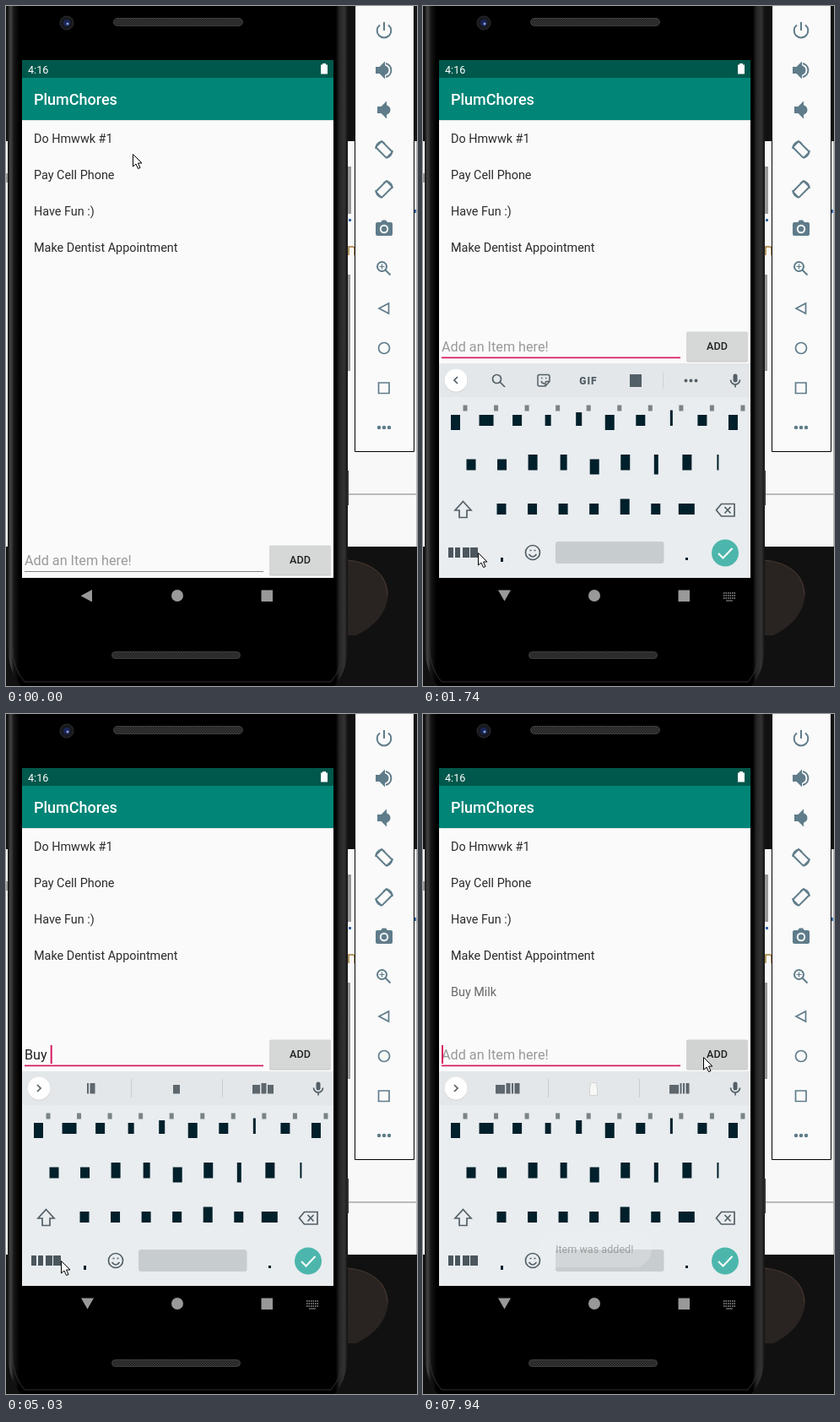
Write an HTML page that moves like this. It is 487 px wide and 805 px high and loops after 8 s.

```html
<!DOCTYPE html>
<html lang="en">
<head>
<meta charset="utf-8">
<title>Todo list demo</title>
<style>
  html, body { margin: 0; width: 100%; height: 100%; overflow: hidden; background: #111; }
  svg { display: block; width: 487px; height: 805px; font-family: Roboto, sans-serif; }
  text { white-space: pre; }
  .line { fill: none; stroke: #5f7c8a; stroke-width: 2; }
  .key { fill: none; stroke: #535f66; stroke-width: 1.7; }
  .item { font-size: 14.4px; fill: #2b2b2b; }
</style>
</head>
<body>
<svg viewBox="0 0 487 805">
  <defs>
    <linearGradient id="edge">
      <stop offset="0" stop-color="#111"/><stop offset=".008" stop-color="#444"/>
      <stop offset=".018" stop-color="#161616"/><stop offset=".035" stop-color="#000"/>
      <stop offset=".965" stop-color="#000"/><stop offset=".975" stop-color="#242424"/>
      <stop offset=".99" stop-color="#333"/><stop offset="1" stop-color="#111"/>
    </linearGradient>
    <pattern id="mesh" width="3" height="3" patternUnits="userSpaceOnUse">
      <path fill="#1c1c1c" d="M0 0h3v3h-3z"/><path fill="#3b3b3b" d="M0 0h1.5v1.5h-1.5zM1.5 1.5h1.5v1.5h-1.5z"/>
    </pattern>
    <g id="rotate" class="line">
      <rect x="-9" y="-5" width="18" height="10" rx="1.5" transform="rotate(45)"/>
      <path d="M-10 -1A10 10 0 0 1 -3 -10l4 3M10 1A10 10 0 0 1 3 10" stroke-width="1.6"/>
    </g>
    <g id="speaker" fill="#5f7c8a"><path d="M-9 -3h4l5 -5v16l-5 -5h-4zM2 -4a4.5 4.5 0 0 1 0 8z"/></g>
  </defs>

  <!-- desktop behind the phone -->
  <path fill="#111" d="M0 0h487v805h-487z"/>
  <path fill="#f8f8f8" d="M0 160h487v480h-487z"/>
  <path fill="#292321" d="M400 655Q452 660 453 697Q450 728 415 745H400z"/>
  <path fill="none" stroke="#47382f" d="M405 656Q450 661 452 697"/>
  <path fill="#999" d="M404 190h5v56h-5zM404 318h4v114h-4zM0 198h3v11h-3z"/>
  <path fill="#bbb" d="M400 577h87v2h-87zM486 160h1v480h-1z"/>
  <path fill="#3567a5" d="M406 252h3v3h-3zM484 241h2v4h-2z"/>
  <path fill="none" stroke="#a07935" stroke-width="1.5" d="M406 295v-10h5q2 0 2 3v7"/>

  <!-- phone -->
  <path fill="url(#edge)" d="M2 0H405V755Q405 788 389 805H18Q2 788 2 755z"/>
  <path fill="none" stroke="#303030" d="M7.5 0V757Q8 785 22 800H385Q399 785 399.500 757V0"/>
  <path fill="#333" d="M404 550h2v41h-2z"/>
  <circle cx="72" cy="20" r="8" fill="#17191d" stroke="#2b2d31"/>
  <circle cx="72" cy="20" r="4" fill="#1b2557"/><circle cx="73" cy="21" r="1.5" fill="#8ba3d8"/>
  <g fill="url(#mesh)" stroke="#3d3d3d">
    <rect x="127.500" y="14.500" width="153" height="9" rx="4.500"/>
    <rect x="125.500" y="764.500" width="152" height="8" rx="4"/>
  </g>

  <!-- app -->
  <path fill="#fafafa" d="M19 64h369v613h-369z"/>
  <path fill="#00574b" d="M19 64h369v21h-369z"/>
  <path fill="#008577" d="M19 85h369v50h-369z"/>
  <path fill="#dfe4e3" d="M19 135h369v1h-369z"/>
  <text x="26" y="79.500" font-size="12.600" fill="#fff">4:16</text>
  <path fill="#fff" d="M375 68h4v1.500h2v11h-8v-11h2z"/>
  <text x="33" y="117" font-size="18" font-weight="500" fill="#fff">PlumChores</text>
  <g id="list"></g>

  <g id="entry">
    <text id="hint" x="22" y="662" font-size="16.200" fill="#999">Add an Item here!</text>
    <text id="typed" x="22" y="662" font-size="16.200" fill="#222"><tspan id="done"></tspan><tspan id="word" text-decoration="underline"></tspan></text>
    <rect id="rule" x="22" width="283"/>
    <rect id="caret" y="645" width="2" height="22" fill="#d81b60"/>
    <rect x="312" y="639.500" width="73" height="35" rx="2" fill="#ccc"/>
    <rect id="button" x="312" y="638.500" width="73" height="34.500" rx="2"/>
    <text x="348.500" y="660" font-size="12.600" font-weight="500" text-anchor="middle" fill="#222">ADD</text>
  </g>

  <svg x="19" y="380" width="369" height="297" viewBox="19 380 369 297">
    <g id="keyboard">
      <path fill="#e9edf0" d="M19 423h369v254h-369z"/>
      <path fill="#e3e7ea" d="M19 423h369v40h-369z"/>
      <circle cx="39" cy="443.500" r="14" fill="#d2d6d9"/><circle cx="39" cy="443" r="13.500" fill="#fff"/>
      <path id="chevron" class="key"/>
      <g id="tools" class="key">
        <circle cx="87.500" cy="441.500" r="5"/><path d="M91 445l6 6"/>
        <path d="M138 436.500h10q2 0 2 2v6l-5 5.500h-7q-2 0 -2 -2v-9.500q0 -2 2 -2zM150 444.500h-3.500q-1.500 0 -1.500 1.500v4M140 444q1 3 4 3M140 440.500h1.500M145 440.500h1.500" stroke-width="1.5"/>
        <text x="196" y="447.500" font-size="12" font-weight="900" letter-spacing="1" text-anchor="middle" fill="#535f66" stroke="none">GIF</text>
        <path d="M245 436h14v15h-14z" fill="#535f66" stroke="none"/>
        <path d="M284.500 433v20" stroke="#cdd2d5" stroke-width="1"/>
        <path d="M311.500 443.500h0M317.500 443.500h0M323.500 443.500h0" stroke-width="4" stroke-linecap="round"/>
      </g>
      <g id="guesses">
        <path stroke="#c8cdd0" d="M148.500 432v22M256.500 432v22"/>
        <g id="guessBlocks" fill="#5d676d"></g>
        <path id="glass" fill="#f7f7f5" stroke="#d3d5d4" d="M198.500 436.500h7v4l1 2v9h-9v-9l1 -2z"/>
      </g>
      <rect x="367.500" y="435.500" width="5" height="10" rx="2.500" fill="#535f66"/>
      <path class="key" d="M364.500 442.500a5.500 5.500 0 0 0 11 0M370 448v3.500" stroke-width="1.5"/>
      <g id="keys"></g>
      <path class="key" d="M47.500 586.500l9.500 10.500h-5v8.500h-9v-8.500h-5z"/>
      <path class="key" d="M353.500 589.500h15.500v14.500h-15.500l-6 -7.250zM357.500 593l7 7.500M364.500 593l-7 7.500"/>
      <path fill="#4b565d" d="M30 641h6v12h-6zM38 641h6v12h-6zM47 641h8v12h-8zM56 641h9v12h-9z"/>
      <path fill="#00202b" d="M92 653h3v5h-3zM311 653h3v3h-3z"/>
      <g class="key"><circle cx="130" cy="647" r="8.500"/><path d="M125.500 649q4.500 6 9 0M126.500 644.500h2M131.500 644.500h2"/></g>
      <rect x="157" y="634" width="128.500" height="26" rx="3" fill="#c7cccf"/>
      <circle cx="358" cy="647.500" r="16" fill="#4db6ac"/>
      <path d="M350 648l5.500 5.500 11 -11.500" fill="none" stroke="#fff" stroke-width="2"/>
    </g>
  </svg>
  <g id="toast">
    <rect x="137" y="612" width="134" height="43" rx="21" fill="#f2f2f2" opacity=".45"/>
    <text x="157" y="638" font-size="12.600" fill="#777">Item was added!</text>
  </g>

  <!-- navigation bar -->
  <g fill="#999">
    <path id="back"/>
    <circle cx="203" cy="698" r="7"/><path d="M302.500 691.500h13.500v13.500h-13.500z"/>
    <g id="keyboardIcon" fill="none" stroke="#999" stroke-dasharray="1.500 1">
      <path d="M356 695h14M356 698h14M356 701h14" stroke-width="1.5"/><path d="M359 704h8" stroke-dasharray="none"/>
    </g>
  </g>

  <!-- emulator panel -->
  <path fill="#fafafa" stroke="#000" d="M413.500 -1H483.500V527.500H413.500z"/>
  <g class="line">
    <path d="M448 19v10M443 22.500a8.300 8.300 0 1 0 10 0"/>
    <g transform="translate(448 76)"><use href="#speaker"/><path d="M2 -8a8.200 8.200 0 0 1 0 16"/></g>
    <use href="#speaker" x="450" y="123"/>
    <use href="#rotate" x="448" y="170"/>
    <use href="#rotate" transform="translate(448 217) scale(-1 1)"/>
    <path d="M440 256h4l2 -2.500h4l2 2.500h4q2 0 2 2v12q0 2 -2 2h-16q-2 0 -2 -2v-12q0 -2 2 -2z" fill="#5f7c8a" stroke="none"/>
    <circle cx="448" cy="264" r="4.200" stroke="#fafafa"/>
    <circle cx="445.500" cy="308.500" r="5.500"/><path d="M449.500 312.500l6 6"/><path d="M442.500 308.500h6M445.500 305.500v6" stroke-width="1.2"/>
    <path d="M442 358l11.500 -6v12z" stroke-width="1.7"/>
    <circle cx="448" cy="405" r="6.500" stroke-width="1.7"/>
    <path d="M441.500 446h12.500v12.500h-12.500z" stroke-width="1.7"/>
    <path d="M442 499h0M448 499h0M454 499h0" stroke-width="4.500" stroke-linecap="round"/>
  </g>

  <path id="pointer" fill="#fff" stroke="#000" d="M.5 .5v14.500l3.500 -3 2.500 5.500 2.500 -1 -2.500 -5.500h4.500z"/>
</svg>
<script>
const $ = id => document.getElementById(id);
const set = (id, attrs) => { for (const k in attrs) $(id).setAttribute(k, attrs[k]); };
const show = (id, on) => set(id, { opacity: +on });
const block = (x, y, w, h, fill) => `<rect x="${x}" y="${y}" width="${w}" height="${h}" fill="${fill}"/>`;

$('list').innerHTML = ['Do Hmwwk #1', 'Pay Cell Phone', 'Have Fun :)', 'Make Dentist Appointment', 'Buy Milk']
  .map((s, i) => `<text class="item" x="33" y="${162 + 43 * i}" ${i == 4 ? 'id="added"' : ''}>${s}</text>`).join('');

// Keys are blocks sized like their letters: ascenders rise, descenders drop.
const widths = { w: 17, m: 19, i: 3, l: 2, j: 5, f: 8, r: 7, t: 7 };
const keyRow = (letters, x, base) => [...letters].map((c, i) => {
  const w = widths[c] || 11;
  const top = 'bdfhijkl'.includes(c) ? 18.5 : c == 't' ? 16 : 13;
  const drop = 'gjpqy'.includes(c) ? 5 : 0;
  return block(x + 36.55 * i - w / 2, base - top, w, top + drop, '#00202b');
}).join('');
$('keys').innerHTML = keyRow('qwertyuiop', 38.5, 497) + keyRow('asdfghjkl', 57, 549.5) + keyRow('zxcvbnm', 93, 602) +
  Array.from({ length: 10 }, (_, i) => block(47.5 + 36.55 * i, 472.5, 5, 7, '#7b8387')).join('');

// Each suggestion is [start x, block widths...].
const guesses = {
  B: [[97, 7], [197, 10], [293, 8, 9]],
  Bu: [[92, 8, 6], [196, 6, 5], [292, 8, 6, 8]],
  Buy: [[90, 8, 6, 6], [194, 6, 8], [292, 9, 7, 9]],
  'Buy ': [[96, 2, 6], [198, 8], [292, 9, 6, 7]],
  M: [[96, 9], [196, 6, 6], [296, 8, 8]],
  Mi: [[92, 11, 2, 5], [196, 9, 2], [293, 11, 2, 2, 6]],
  Milk: [[86, 11, 5, 2, 6], [], [292, 11, 2, 2, 4]]
};
const drawGuesses = name => guesses[name].map(([start, ...sizes]) => {
  let x = start;
  return sizes.map((w, i) => {
    const y = w < 7 ? 437 : 439, b = block(x, y, w, 449.5 - y, '#5d676d');
    x += w + 1.5;
    return b;
  }).join('');
}).join('');

// Stepped tracks: [time, value...], held until the next entry.
const pointer = [[0, 150, 175], [150, 130, 318], [270, 113, 463], [570, 107, 505], [690, 99, 569], [810, 85, 640],
  [930, 69, 681], [1050, 65, 653], [1350, 65, 647], [6590, 174, 518], [6720, 280, 416], [6870, 295, 413],
  [7000, 307, 411], [7120, 314, 409], [7270, 330, 407], [7420, 332, 406]];
const typing = [[0, '', ''], [4640, '', 'B'], [4790, '', 'Bu'], [4910, '', 'Buy'], [5030, 'Buy ', ''],
  [5590, 'Buy ', 'M'], [5890, 'Buy ', 'Mi'], [6010, 'Buy ', 'Milk'], [7690, '', '']];
const guessing = [[0, 'B'], [4790, 'Bu'], [4910, 'Buy'], [5030, 'Buy '], [5590, 'M'], [5740, 'Mi'], [6160, 'Milk']];
const blink = [[0, 0], [1350, 1], [1620, 0], [2200, 1], [2760, 0], [3320, 1], [3780, 0], [4210, 1], [6590, 0], [7120, 1]];
const slide = [[0, 60, 0], [1620, 24, .6], [1740, 0, 1]];
const fadeItem = [[0, 0], [7690, .25], [7820, .5], [7940, .7]];
const fadeToast = [[0, 0], [7820, .25], [7940, .6]];
const press = [[0, '#d6d7d7'], [7570, '#cacbcb'], [7820, '#d1d2d2']];
const at = (track, t) => track.findLast(step => step[0] <= t).slice(1);

function draw(now) {
  const t = now % 8000, focused = t >= 1200, open = t >= 1620, wide = t >= 4640;
  const [px, py] = at(pointer, t), [done, word] = at(typing, t), [drop, alpha] = at(slide, t);
  const [guess] = at(guessing, t);
  set('pointer', { transform: `translate(${px} ${py})` });
  set('entry', { transform: `translate(0 ${open ? -253 : 0})` });
  set('rule', { y: focused ? 668.5 : 669, height: focused ? 1.7 : 1, fill: focused ? '#d81b60' : '#868686' });
  set('button', { fill: at(press, t)[0] });
  $('done').textContent = done;
  $('word').textContent = word;
  show('hint', !(done + word));
  set('caret', { x: 22 + (done + word ? $('typed').getComputedTextLength() : 0), opacity: at(blink, t)[0] });
  set('keyboard', { transform: `translate(0 ${drop})`, opacity: alpha });
  set('chevron', { d: wide ? 'M37 439l4 4 -4 4' : 'M41 439l-4 4 4 4' });
  show('tools', !wide);
  show('guesses', wide);
  show('glass', guess == 'Milk');
  $('guessBlocks').innerHTML = drawGuesses(guess);
  set('back', { d: open ? 'M89 691.500h15l-7.500 13z' : 'M102 691v14.500l-13.500 -7.250z' });
  show('keyboardIcon', t >= 1350);
  show('added', at(fadeItem, t)[0]);
  set('added', { opacity: at(fadeItem, t)[0] });
  set('toast', { opacity: at(fadeToast, t)[0] });
}

const start = performance.now();
function tick() {
  draw(performance.now() - start);
  requestAnimationFrame(tick);
}
tick();
</script>
</body>
</html>
```
